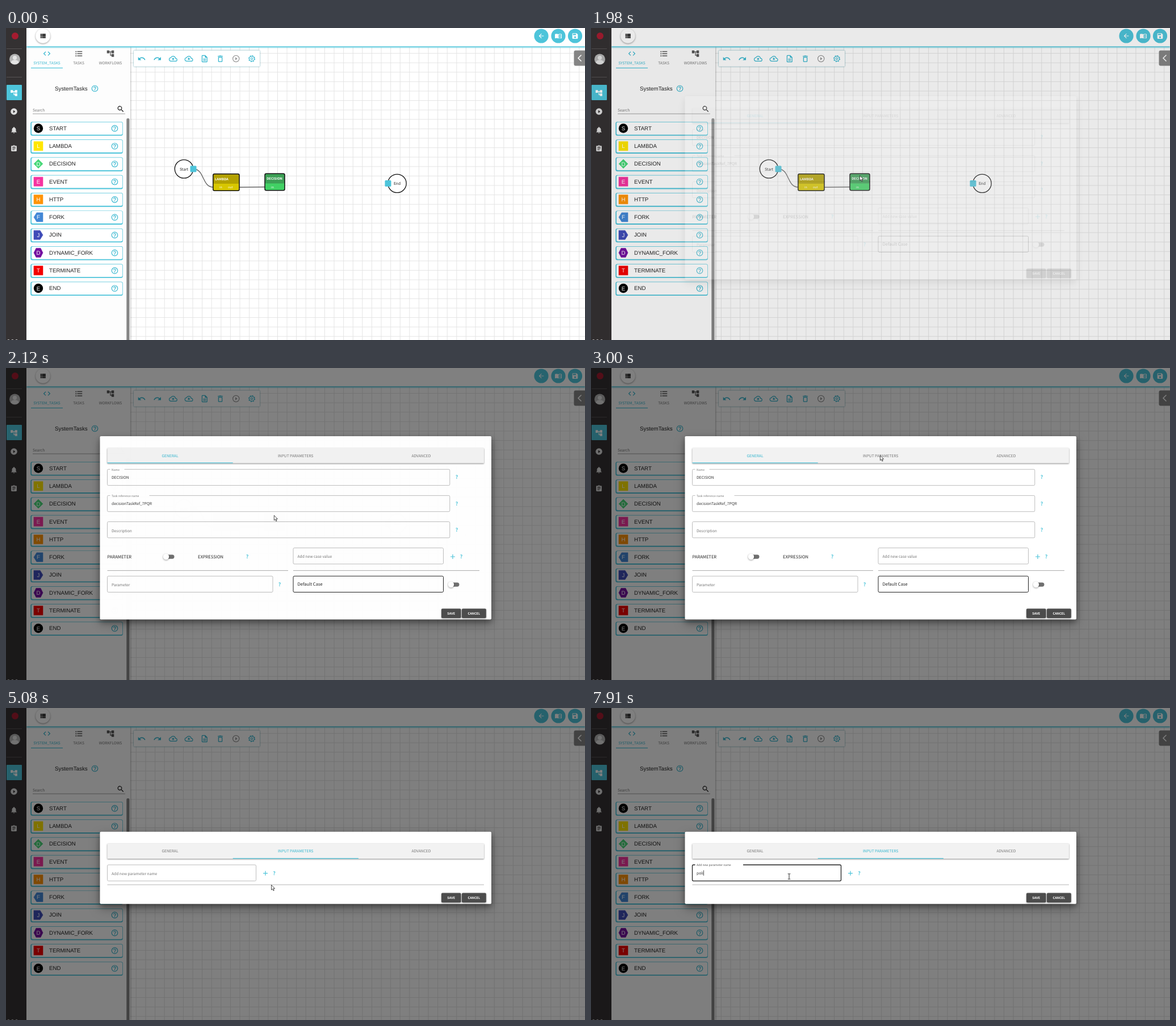
These frames come from a looping animation (1020x549 px, 8 s). An HTML page:

```html
<!DOCTYPE html>
<html lang="en">
<head>
<meta charset="utf-8">
<title>Workflow builder</title>
<style>
html, body { margin: 0; width: 100%; height: 100%; overflow: hidden; background: #fff; }
svg { display: block; width: 100%; height: 100%; }
text { font-family: "Noto Sans CJK SC", "Noto Sans CJK JP", "Noto Sans", sans-serif; text-rendering: geometricPrecision; white-space: pre; }
.arial { font-family: "Liberation Sans", Arial, sans-serif; }
.head { filter: drop-shadow(0 2px 1.3px #4dc4da); }
.side { filter: drop-shadow(1px 0 1.2px #0004); }
.lift { filter: drop-shadow(0 1px 1.5px #0006); }
.bar { filter: drop-shadow(0 1.2px 1.2px #0007); }
.tools { filter: drop-shadow(0 .4px 1px #2b7f90d0); }
.paper { filter: drop-shadow(0 4px 5px #0005) drop-shadow(0 7px 9px #0004); }
</style>
</head>
<body>
<svg viewBox="0 0 1020 549" preserveAspectRatio="none">
  <g id="app"></g>
  <g id="layer"></g>
</svg>
<script>
const CYAN = '#4dc4da', DEEP = '#35b6cf', GREY = '#757575', INK = '#222';

// Icon outlines on a 24 unit square
const disc = 'M12 2a10 10 0 1 0 0 20 10 10 0 1 0 0-20z';
const ring = disc + 'm0 2a8 8 0 1 1 0 16 8 8 0 1 1 0-16z';
const cloud = 'M19.35 10.04C18.67 6.59 15.64 4 12 4 9.11 4 6.6 5.64 5.35 8.04 2.34 8.36 0 10.91 0 14c0 3.31 2.69 6 6 6h13c2.76 0 5-2.24 5-5 0-2.64-2.05-4.78-4.65-4.96zM19 18H6c-2.21 0-4-1.79-4-4 0-2.05 1.53-3.76 3.56-3.97l1.07-.11.5-.95C8.08 7.14 9.94 6 12 6c2.62 0 4.88 1.86 5.39 4.43l.3 1.5 1.53.11c1.56.1 2.78 1.41 2.78 2.96 0 1.65-1.35 3-3 3z';
const bin = 'M6 19c0 1.1.9 2 2 2h8c1.1 0 2-.9 2-2V7H6zM19 4h-3.5l-1-1h-5l-1 1H5v2h14z';
const ICONS = {
  code: 'M9.4 16.6 4.8 12l4.6-4.6L8 6l-6 6 6 6zm5.2 0 4.6-4.6-4.6-4.6L16 6l6 6-6 6z',
  list: 'M3 5h3v3H3zm0 6h3v3H3zm0 6h3v3H3zM8 5h14v2.4H8zm0 6h14v2.4H8zm0 6h14v2.4H8z',
  rows: 'M4 14h4v-4H4zm0 5h4v-4H4zM4 9h4V5H4zm5 5h12v-4H9zm0 5h12v-4H9zM9 5v4h12V5z',
  tree: 'M22 11V3h-7v3H9V3H2v8h7V8h2v10h4v3h7v-8h-7v3h-2V8h2v3z',
  play: disc + 'm-2 5.5 6 4.5-6 4.5z',
  run: ring + 'M10 7.5l6 4.5-6 4.5z',
  bell: 'M12 22c1.1 0 2-.9 2-2h-4c0 1.1.9 2 2 2zm6-6v-5c0-3.07-1.64-5.64-4.5-6.32V4a1.5 1.5 0 0 0-3 0v.68C7.63 5.36 6 7.92 6 11v5l-2 2v1h16v-1z',
  board: 'M19 3h-4.2a3 3 0 0 0-5.6 0H5a2 2 0 0 0-2 2v14a2 2 0 0 0 2 2h14a2 2 0 0 0 2-2V5a2 2 0 0 0-2-2zm-7 0a1 1 0 0 1 0 2 1 1 0 0 1 0-2zm2 14H7v-2h7zm3-4H7v-2h10zm0-4H7V7h10z',
  back: 'M20 11H7.83l5.59-5.59L12 4l-8 8 8 8 1.41-1.41L7.83 13H20z',
  book: 'M12 6.5C9 4.5 4 4.5 1 6v14c3-1.5 8-1.5 11 0 3-1.5 8-1.5 11 0V6c-3-1.5-8-1.5-11 .5zm1 2c2.5-1.5 5.5-1.7 8-1v10.5c-2.5-.6-5.5-.5-8 .6zM15 10h5v1.3h-5zm0 3h5v1.3h-5z',
  save: 'M17 3H5a2 2 0 0 0-2 2v14a2 2 0 0 0 2 2h14a2 2 0 0 0 2-2V7zm-5 16a3 3 0 0 1 0-6 3 3 0 0 1 0 6zm3-10H5V5h10z',
  find: 'M15.5 14h-.8l-.3-.3A6.5 6.5 0 1 0 13.7 14.4l.3.3v.8l5 5 1.5-1.5zm-6 0a4.5 4.5 0 1 1 0-9 4.5 4.5 0 0 1 0 9z',
  help: ring + 'M11 16h2v2h-2zM12 6a4 4 0 0 0-4 4h2a2 2 0 0 1 4 0c0 2-3 1.75-3 5h2c0-2.25 3-2.5 3-5a4 4 0 0 0-4-4z',
  undo: 'M12.5 8c-2.65 0-5.05 1-6.9 2.6L2 7v9h9l-3.62-3.62A8 8 0 0 1 20.1 16l2.37-.78C21.08 11.03 17.15 8 12.5 8z',
  redo: 'M11.5 8c2.65 0 5.05 1 6.9 2.6L22 7v9h-9l3.62-3.62A8 8 0 0 0 3.9 16l-2.37-.78C2.92 11.03 6.85 8 11.5 8z',
  up: cloud + 'M8 13h2.55v3h2.9v-3H16l-4-4z',
  down: cloud + 'M8 12h2.55V9h2.9v3H16l-4 4z',
  page: 'M8 16h8v2H8zm0-4h8v2H8zm6-10H6a2 2 0 0 0-2 2v16a2 2 0 0 0 2 2h12a2 2 0 0 0 2-2V8zm4 18H6V4h7v5h5z',
  bin,
  binLine: bin + 'M8 9h8v10H8z'
};

const icon = (name, x, y, size, fill) =>
  `<path transform="translate(${x - size / 2} ${y - size / 2}) scale(${size / 24})" d="${ICONS[name]}" fill="${fill}" fill-rule="evenodd"/>`;
const rect = (x, y, w, h, fill, more = '') =>
  `<rect x="${x}" y="${y}" width="${w}" height="${h}" fill="${fill}" ${more}/>`;
const circle = (x, y, r, fill, more = '') => `<circle cx="${x}" cy="${y}" r="${r}" fill="${fill}" ${more}/>`;
const path = (d, stroke, width = 1, fill = 'none') =>
  `<path d="${d}" stroke="${stroke}" stroke-width="${width}" fill="${fill}"/>`;
const text = (x, y, size, str, fill = INK, more = '') =>
  `<text x="${x}" y="${y}" font-size="${size}" fill="${fill}" ${more}>${str}</text>`;
const MID = 'text-anchor="middle"', BOLD = 'font-weight="700"', ARIAL = 'class="arial"';

function sidebar() {
  return rect(0, 0, 36, 549, '#343132') + circle(16, 14, 6, '#a51c30') +
    path('M1 36.5H28M1 86.5H28', '#565354') +
    circle(15.5, 55, 9.5, '#b5b5b5') + circle(15.5, 52.3, 3.6, '#e4e4e4') +
    path('M8.5 61a7 4.8 0 0 1 14 0 9.5 9.5 0 0 1-14 0z', 'none', 0, '#e4e4e4') +
    rect(1, 100, 27, 27, CYAN, 'rx="1"') + icon('tree', 14, 114.5, 14, '#fff') +
    icon('play', 14, 147, 14, '#ddd') + icon('bell', 14, 179.5, 14, '#ddd') +
    icon('board', 14, 212, 13, '#ddd') + text(2, 553.5, 8.5, '0.0.0', '#fff');
}

function header() {
  const buttons = [['back', 943], ['book', 973], ['save', 1002.5]];
  return rect(36, -5, 984, 37.2, '#fff', 'class="head"') +
    circle(65, 14, 12.8, '#fff', 'class="lift"') + icon('rows', 65, 14, 13, '#111') +
    buttons.map(([name, x]) => circle(x, 14, 12.6, CYAN) + icon(name, x, 14, 13, '#fff')).join('');
}

const TASKS = [
  ['START', '#000', ''], ['LAMBDA', '#ffe600', '-8,-8 8,-8 8,8 -8,8'],
  ['DECISION', '#48d878', '0,-8 8,0 0,8 -8,0'], ['EVENT', '#f533a0', '-8,-8 8,-8 8,8 -8,8'],
  ['HTTP', '#ff9408', '-8,-8 8,-8 8,8 -8,8'], ['FORK', '#4287d6', '-8,0 -3,-8 8,-8 8,8 -3,8'],
  ['JOIN', '#3f4cb8', '8,0 3,-8 -8,-8 -8,8 3,8'], ['DYNAMIC_FORK', '#7410a0', '-8,0 -4,-8 4,-8 8,0 4,8 -4,8'],
  ['TERMINATE', '#f40000', '-8,-8 8,-8 8,8 -8,8'], ['END', '#000', '']
];

function taskRow([name, color, points], i) {
  const y = 176.5 + i * 31.28;
  const mark = points
    ? `<polygon transform="translate(57 ${y})" points="${points}" fill="${color}" stroke="${color}" stroke-linejoin="round" stroke-width=".6"/>`
    : circle(57, y, 8.2, color);
  return rect(43.3, y - 11.5, 162.5, 24.6, CYAN, 'rx="3"') +
    rect(45, y - 10.8, 160.1, 22, '#fff', 'rx="2.3"') + mark +
    text(57, y + 3.5, 9.7, name[0], '#fff', `${MID} ${ARIAL}`) +
    text(76, y + 3.3, 9.7, name, INK, ARIAL) + icon('help', 191.5, y + .2, 14, DEEP);
}

function panel() {
  const tabs = [['code', 72, 'SYSTEM_TASKS', DEEP], ['list', 128, 'TASKS', '#555'], ['tree', 184, 'WORKFLOWS', '#555']];
  return rect(36, 32, 183, 517, '#fdfdfd', 'class="side"') +
    tabs.map(([name, x, label, c]) => icon(name, x, 45, 15, c) +
      text(x, 64, 6.6, label, c === DEEP ? c : GREY, MID)).join('') +
    rect(44, 69.8, 56, 1.2, CYAN) + text(86, 109.5, 9.8, 'SystemTasks', INK, ARIAL) +
    icon('help', 156.5, 106.5, 14, DEEP) + text(47, 147, 6.7, 'Search', GREY) +
    icon('find', 202, 142.5, 14.5, '#111') + path('M47 151H210', '#888', .8) +
    TASKS.map(taskRow).join('') + rect(212.3, 159, 5.2, 395, '#868686', 'rx="2"');
}

function toolbar() {
  const names = ['undo', 'redo', 'up', 'down', 'page', 'binLine', 'run'];
  return rect(225, 39.5, 222, 28.3, '#fff', 'rx="1" class="tools"') +
    names.map((n, i) => icon(n, 239 + 27.7 * i, 54, 15, n === 'run' ? '#999' : DEEP)).join('') +
    `<g fill="none" stroke="${DEEP}"><circle cx="433" cy="54" r="4.4" stroke-width="1.1"/>
     <circle cx="433" cy="54" r="5.4" stroke-width="1.2" stroke-dasharray="2 2.241"/><circle cx="433" cy="54" r="1.7"/></g>` +
    rect(1000.5, 39.5, 24, 27, '#858585', 'rx="3"') + path('M1013.5 47.5L1008 53L1013.5 58.5', '#fff', 1.5);
}

function grid() {
  const step = 25 * 1020 / 1536;
  let d = '';
  for (let x = 229.4; x < 1020; x += step) d += `M${x} 34V549`;
  for (let y = 44.6; y < 549; y += step) d += `M219 ${y}H1020`;
  return path(d, '#e2e2e2', .9);
}

function node(x, y, w, name, top, low) {
  return rect(x, y, w, 29.5, low, 'rx="2.5"') + rect(x, y, w, 17.3, top, 'rx="2"') +
    rect(x, y, w, 29.5, 'none', 'rx="2.5" stroke="#111" stroke-width="1.5"') +
    text(x + 3.2, y + 10.8, 5.8, name, '#fff', BOLD);
}

function diagram() {
  const ringed = (x, y, name) => circle(x, y, 16.2, '#fff', 'stroke="#111" stroke-width="1.3"') + text(x, y + 2.6, 6.7, name, INK, MID);
  const port = (x, y) => rect(x - 5.5, y - 5.5, 11, 11, CYAN, 'rx="1.5"');
  return grid() +
    path('M330 248C350 248 345 280 365 280M411 280.2L456 279.7', '#666', 1.4) +
    ringed(313.5, 248, 'Start') + port(330, 248) + ringed(689, 273.5, 'End') + port(673, 273.5) +
    node(364.8, 256.8, 46.2, 'LAMBDA', '#b3a100', '#d8c700') + text(376, 282, 5.4, 'in', '#fff') + text(391, 282, 5.4, 'out', '#fff') +
    node(456, 256.2, 35, 'DECISION', '#3c9f55', '#41d164') + text(467, 281.5, 5.4, 'in', '#fff');
}

// Dialog parts; y counts from the dialog's top edge
const hint = (x, y) => text(x, y + 3.3, 8.8, '?', CYAN, `${MID} ${BOLD}`);
const plus = (x, y) => path(`M${x - 4} ${y}H${x + 4}M${x} ${y - 4}V${y + 4}`, CYAN, 1.2);
const box = (x, y, w, stroke = '#bdbdbd', width = 1) =>
  rect(x, y, w, 28.3, '#fff', `rx="2" stroke="${stroke}" stroke-width="${width}"`);
const notch = (x, y, w) => rect(x + 5, y - 1.5, w, 3, '#fff');
const named = (x, y, w, gap, label, value, stroke) => box(x, y, w, stroke) + notch(x, y, gap) +
  text(186, y + 2.5, 5.05, label, GREY) + text(186, y + 16.3, 6.7, value, '#333');
const toggle = (x, y) => rect(x - 3, y - 3.5, 17.5, 7.2, '#6f6f6f', 'rx="3.6"') + circle(x, y, 5.2, '#fff', 'class="lift"');

function general() {
  return named(178.5, 58.3, 603.3, 25, 'Name', 'DECISION') + hint(794, 72) +
    named(178.5, 104.4, 603.3, 69, 'Task reference name', 'decisionTaskRef_7PQR') + hint(794, 118.5) +
    box(178.5, 150.5, 603.3) + text(186, 168.5, 6.7, 'Description', GREY) + hint(794, 165) +
    text(178.5, 214.8, 7.55, 'PARAMETER') + toggle(282, 212) + text(338, 214.8, 7.55, 'EXPRESSION') + hint(425, 212) +
    box(506, 196.6, 264.5) + text(513.5, 214.3, 6.7, 'Add new case value', GREY) + plus(787, 212) + hint(802, 212) +
    path('M178.5 236.4H497M506 236.4H834', '#aaa') +
    box(178.5, 246.2, 291.5) + text(186, 264, 6.7, 'Parameter', GREY) + hint(482, 260.5) +
    box(506, 246.2, 264.5, INK) + text(513.5, 262.8, 7.6, 'Default Case') + toggle(784, 261);
}

const clamp = v => Math.max(0, Math.min(1, v));
const ease = (t, start, length) => { const p = clamp((t - start) / length); return p * p * (3 - 2 * p); };

const OPEN = 1930, SWITCH = 3140, REMOVE = 5010, FOCUS = 5830;
const KEYS = [7430, 7500, 7710, 7910], WIDTHS = [0, 4.2, 8.2, 10.1, 12];

function inputs(t, top, [cx, cy]) {
  const over = (y, w) => cx > 178 && cx < 178 + w && cy > top + y + 2 && cy < top + y + 28;
  const f = ease(t, FOCUS, 200), focused = t >= FOCUS;
  let s = box(178.5, 58.2, 262, focused || over(58, 262) ? INK : '#bdbdbd', focused ? 1.3 : 1);
  if (f) s += notch(178.5, 58.2, 84.5 * f);
  s += text(186, 76 - 15.4 * f, 6.7 - 1.65 * f, 'Add new parameter name', focused ? '#555' : GREY);
  if (focused) {
    const n = KEYS.filter(k => t >= k).length;
    s += text(186, 75, 6.7, 'poli'.slice(0, n), '#333');
    if (t > 5900 && (t < 6370 || t >= 6900)) s += rect(186.2 + WIDTHS[n], 67.7, .7, 9.5, '#111');
  }
  s += plus(457, 73) + hint(472.5, 73) + path('M178.5 93.2H842', '#b5b5b5');
  if (t < REMOVE) s += named(178.5, 99.3, 264, 25, 'param', '${workflow.input.param}', over(99, 264) ? INK : undefined) +
    icon('bin', 465, 113, 14, CYAN);
  return s;
}

function dialog(t, at) {
  const top = t < SWITCH ? 120 : t < REMOVE ? 198.8 : 217.8;
  const h = 2 * (281.3 - top), active = t < SWITCH ? 0 : 1, fade = ease(t, OPEN, 200);
  const tabs = ['GENERAL', 'INPUT PARAMETERS', 'ADVANCED'];
  const button = (x, w, label) => rect(x, h - 19.2, w, 16.6, '#4c4c4c', 'rx="1.8" class="lift"') +
    text(x + w / 2, h - 8.7, 5.6, label, '#fff', `${MID} ${BOLD}`);
  return rect(0, 0, 1020, 549, '#000', `opacity="${fade / 2}"`) +
    `<g opacity="${fade}" transform="translate(0 ${top})">` + rect(165.5, 0, 689.5, h, '#fff', 'rx="1.8" class="paper"') +
    rect(178.5, 20.7, 663.5, 26.8, '#f2f2f2', 'rx="1" class="bar"') +
    tabs.map((s, i) => text(289 + 221.2 * i, 36.6, 6.65, s, i === active ? DEEP : GREY, MID)).join('') +
    rect(178.5 + 221.2 * ease(t, SWITCH, 280), 46.3, 221.2, 1.2, CYAN) +
    (active ? inputs(t, top, at) : general()) +
    button(767, 34.5, 'SAVE') + button(803, 42.8, 'CANCEL') + '</g>';
}

// Pointer stops: time, x, y
const STOPS = [[190, 948, 538], [390, 600, 421], [530, 600, 421], [1120, 468, 254], [1460, 468, 254], [1710, 474.3, 260],
  [1930, 474.3, 260], [2050, 472.3, 259.3], [2680, 472.3, 259.3], [2980, 509.5, 153.8], [3560, 509.5, 153.8],
  [3980, 284.7, 258.5], [4320, 262, 312], [4390, 262, 312], [4720, 457, 324], [4870, 467.5, 311.3],
  [5080, 467.5, 311.3], [5630, 349, 296.5]];

function pointerAt(t) {
  const i = STOPS.findIndex(s => s[0] > t);
  if (i < 1) return STOPS[i < 0 ? STOPS.length - 1 : 0].slice(1);
  const [t0, x0, y0] = STOPS[i - 1], [t1, x1, y1] = STOPS[i], p = ease(t, t0, t1 - t0);
  return [x0 + (x1 - x0) * p, y0 + (y1 - y0) * p];
}

function pointer(t, [x, y]) {
  if (t < 190) return '';
  const inAdd = t < REMOVE ? y > 257 && y < 286 : y > 276 && y < 304;
  const typing = t > SWITCH && x > 178 && x < 441 && (inAdd || (t < REMOVE && y > 298 && y < 326.5));
  return `<g transform="translate(${x} ${y})">` + (typing
    ? path('M-2.3 -4.7H-.6L0 -4.2L.6 -4.7H2.3M0 -4.2V4.2M-2.3 4.7H-.6L0 4.2L.6 4.7H2.3', '#111', .9)
    : path('M0 0V8.8L2 7L3.4 10.2L4.8 9.6L3.4 6.4H6.1Z', '#222', .8, '#fff')) + '</g>';
}

const app = document.getElementById('app'), layer = document.getElementById('layer');
app.innerHTML = diagram() + panel() + header() + toolbar() + sidebar();

function draw() {
  const t = performance.now() % 8000, at = pointerAt(t);
  layer.innerHTML = (t > OPEN ? dialog(t, at) : '') + pointer(t, at);
  requestAnimationFrame(draw);
}
draw();
</script>
</body>
</html>
```
